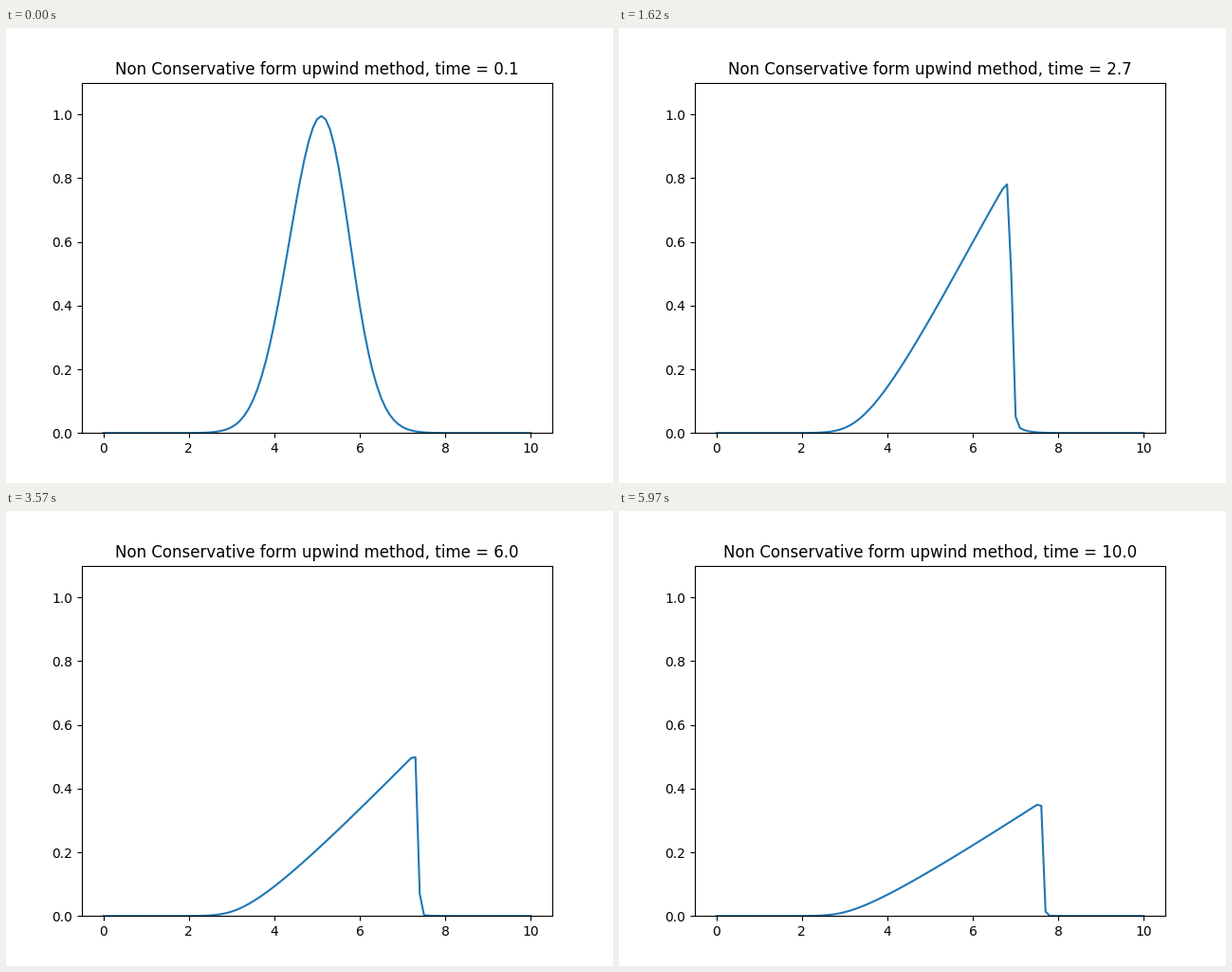
Write a matplotlib script that moves like this. It is 640 px wide and 480 px high and loops after 6000 ms.

```python
import numpy as np
import matplotlib.pyplot as plt
from matplotlib.animation import FuncAnimation

DX, DT, FRAMES = 0.1, 0.05, 200

x = np.linspace(0, 10, 101)


def step(u):
    """One upwind step of u_t + u u_x = 0 in non-conservative form."""
    new = u.copy()
    new[1:] -= DT / DX * u[1:] * (u[1:] - u[:-1])
    return new


# The clock is summed step by step: its rounding shows in the title.
# The wave runs one step ahead of the clock.
u = step(np.exp(-(x - 5) ** 2))
t = 0.0
states = []
for _ in range(FRAMES):
    u = step(u)
    t += DT
    states.append((t, u))

fig, ax = plt.subplots(figsize=(6.4, 4.8), dpi=100)
line, = ax.plot(x, states[0][1], color="#1f77b4", lw=1.5)
ax.set_xlim(-0.5, 10.5)
ax.set_ylim(0, 1.1)
title = ax.set_title("")


def draw(i):
    time, wave = states[i]
    line.set_ydata(wave)
    title.set_text(f"Non Conservative form upwind method, time = {time:.1f}")
    return line, title


anim = FuncAnimation(fig, draw, frames=FRAMES, interval=30,
                     repeat=True, repeat_delay=0, blit=False)
plt.show()
```
